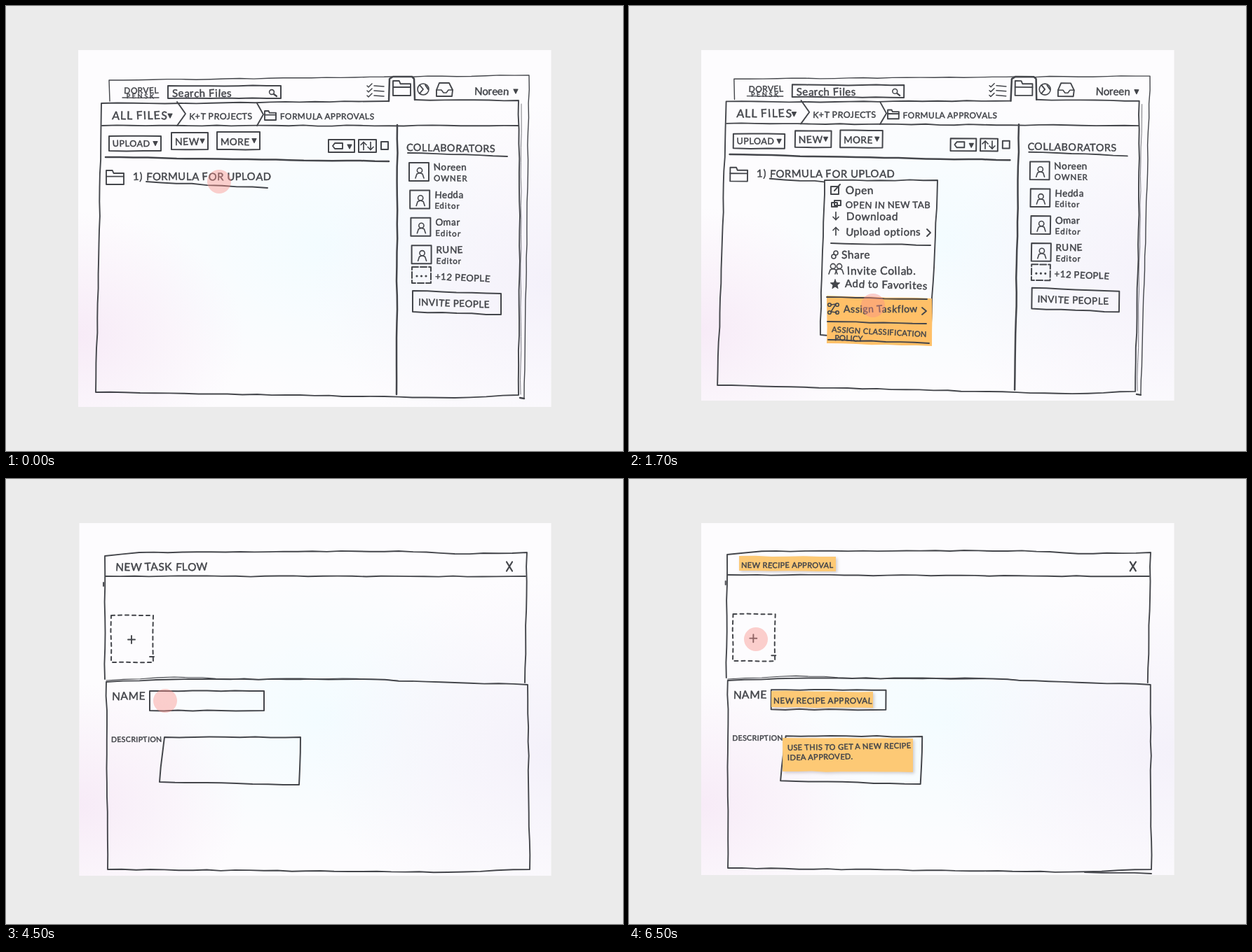
An HTML page for the animation above (8 s loop, 880x636 px).

```html
<!DOCTYPE html>
<html lang="en">
<head>
<meta charset="utf-8">
<title>Task flow wireframe</title>
<style>
html, body { margin: 0; width: 100%; height: 100%; overflow: hidden; background: #ebebeb; }
svg { display: block; width: 100vw; height: 100vh; }
text { font-family: Lato, "Open Sans", sans-serif; fill: #44464b; stroke: #44464b; stroke-width: .5px; white-space: pre; }
path { stroke-linecap: round; stroke-linejoin: round; }
</style>
</head>
<body>
<svg id="stage" viewBox="0 0 880 636" xmlns="http://www.w3.org/2000/svg"></svg>
<script>
const INK = '#44464b', ORANGE = '#ffc068', PALE = '#fdc974', LOOP = 8000;
let out, seed, warp;

const rand = () => {
  seed = (seed * 16807) % 2147483647;
  return seed / 2147483647 - .5;
};

// Each photo was taken from a slightly different angle: shift the four corners.
const bend = ([tl, tr, bl, br]) => (x, y) => {
  const u = (x - 130) / 610, v = (y - 105) / 450;
  const mix = i => (tl[i] * (1 - u) + tr[i] * u) * (1 - v) + (bl[i] * (1 - u) + br[i] * u) * v;
  return [x + mix(0), y + mix(1)];
};
const flat = (x, y) => [x, y];
const fix = n => n.toFixed(1);

// Hand-drawn polyline through "x,y x,y ..."
function ink(s, w = 1.9, { close, fill = 'none', dash, color = INK } = {}) {
  const pts = s.split(' ').map(p => p.split(',').map(Number));
  if (close) pts.push(pts[0]);
  const all = [pts[0]];
  for (let i = 1; i < pts.length; i++) {
    const [ax, ay] = pts[i - 1], [bx, by] = pts[i];
    const n = Math.floor(Math.hypot(bx - ax, by - ay) / 20);
    for (let k = 1; k < n; k++)
      all.push([ax + (bx - ax) * k / n + rand() * 1.3, ay + (by - ay) * k / n + rand() * 1.3]);
    all.push(pts[i]);
  }
  const d = 'M' + all.map(p => warp(...p).map(fix).join(' ')).join('L') + (close ? 'Z' : '');
  out += `<path d="${d}" fill="${fill}" stroke="${color}" stroke-width="${w}"` +
    (dash ? ` stroke-dasharray="${dash}"` : '') + '/>';
}
const shape = (s, w, o) => ink(s, w, { close: true, ...o });

// Box whose sides may drop to the right
const rect = (x, y, w, h, o, drop = 0) =>
  shape(`${x},${y} ${x + w},${y + drop} ${x + w},${y + h + drop} ${x},${y + h}`, 2, o);
const note = (x, y, w, h, drop, fill = ORANGE) => rect(x, y, w, h, { fill, color: 'none' }, drop);

function ring(x, y, r, fill = 'none') {
  const [a, b] = warp(x, y);
  out += `<circle cx="${fix(a)}" cy="${fix(b)}" r="${r}" fill="${fill}" stroke="${INK}" stroke-width="1.6"/>`;
}

function text(s, x, y, size, tilt = 0, gap = size * .04) {
  const [a, b] = warp(x, y).map(fix);
  const turns = [...s].map(() => fix(rand() * 8)).join(' ');
  out += `<text x="${a}" y="${b}" font-size="${size}" letter-spacing="${fix(gap)}"` +
    ` rotate="${turns}" transform="rotate(${tilt} ${a} ${b})">${s}</text>`;
}

const caret = (x, y) => shape(`${x - 3},${y - 3} ${x + 3},${y - 3} ${x},${y + 3}`, 1.2, { fill: INK });
const chevron = (x, y, w, h, lw) => ink(`${x},${y - h} ${x + w},${y} ${x},${y + h}`, lw);
const rule = (x, y, w, drop = 0, lw = 1.9) => ink(`${x},${y} ${x + w},${y + drop}`, lw);

// Arrow with its head at the top (dir 1) or the bottom (dir -1)
function arrow(x, y, dir) {
  const tip = y - 5.5 * dir, wing = tip + 4 * dir;
  ink(`${x},${y + 5.5 * dir} ${x},${tip}`, 1.7);
  ink(`${x - 4},${wing} ${x},${tip} ${x + 4},${wing}`, 1.7);
}

function cross(x, y, rx, ry) {
  ink(`${x - rx},${y - ry} ${x + rx},${y + ry}`, 2.2);
  ink(`${x + rx},${y - ry} ${x - rx},${y + ry}`, 2.2);
}

function folder(x, y, w, h) {
  const lip = y + h * .2, r = x + w, b = y + h;
  shape(`${x},${b} ${x},${y} ${x + w * .35},${y} ${x + w * .42},${lip} ${r},${lip} ${r},${b}`);
  rule(x, y + h * .43, w);
}

function bust(x, y) {
  ring(x, y, 3.6);
  ink(`${x - 6},${y + 11} ${x - 4},${y + 5} ${x},${y + 3.5} ${x + 4},${y + 5} ${x + 6},${y + 11}`, 1.6);
}

function topBar() {
  ink('148,136 147,106 746,99 743,300 739,560', 1.4);
  rule(733, 560, 6, 1, 2.4);
  text('DORVEL', 168, 125, 12);
  text('PENSK', 172, 132, 9, 0, 2.6);
  rule(166, 131, 52, 0, 1.3);
  rect(231, 114, 161, 18);
  text('Search Files', 237, 130, 15);
  ring(379, 123, 3.4);
  rule(382, 126, 4, 3, 2.2);
  for (let y = 115; y < 130; y += 7) {
    ink(`515,${y - 1} 517,${y + 1} 522,${y - 4}`, 1.5);
    rule(525, y - 1, 14, 1, 1.5);
  }
  folder(552, 107, 25, 21);
  ring(595, 119, 8);
  chevron(590, 119, 5, 6);
  rule(598, 113, 4, 6);
  shape('614,120 618,110 632,110 637,120 636,129 614,129');
  ink('614,120 621,120 624,124 628,124 631,120 637,120', 1.6);
  text('Noreen', 668, 127, 15, 0, 0);
  caret(727, 122);
}

function toolButton(label, x, y, w, h, size) {
  rect(x, y, w, h);
  text(label, x + 5, y + h - 6, size);
  caret(x + w - 8, y + h / 2);
}

function browser() {
  topBar();
  ink('546,136 250,139 136,139 133,320 128,552 400,556 640,560 731,556 733,300 731,135 583,134');
  ink('546,136 547,104 552,101 579,101 582,104 583,134', 2.5);
  rule(735, 140, -1, 415, .7);
  rule(137, 171, 594);
  chevron(244, 154, 12, 17);
  chevron(358, 155, 9, 16);
  text('ALL FILES', 151, 162, 16, 0, 1);
  caret(234, 157);
  text('K+T PROJECTS', 261, 162, 12.4);
  folder(369, 150, 16, 13);
  text('FORMULA APPROVALS', 391, 162, 11.8);

  toolButton('UPLOAD', 147, 186, 74, 21, 12.5);
  toolButton('NEW', 236, 181, 52, 24, 14);
  toolButton('MORE', 301, 180, 61, 25, 13.5);
  rect(460, 191, 37, 18);
  shape('466,200 469,196 480,196 480,204 469,204');
  caret(490, 201);
  rect(503, 191, 25, 18);
  arrow(510, 200, 1);
  arrow(520, 200, -1);
  rect(535, 194, 10, 11);
  rule(142, 216, 404, 6, 2.5);
  rule(558, 170, -1, 385, 2.5);

  folder(143, 235, 25, 20);
  text('1)', 181, 249, 15);
  text('FORMULA FOR UPLOAD', 200, 249, 14.8);
  rule(200, 251, 173, 9);
  sidebar();
}

function sidebar() {
  text('COLLABORATORS', 571, 207, 14.3, 1);
  rule(573, 210, 142, 5);
  ['Noreen', 'Hedda', 'Omar', 'RUNE'].forEach((name, i) => {
    const x = 575 + i * 1.2, y = 224 + i * 39.4;
    rect(x, y, 28, 26);
    bust(x + 15, y + 11);
    text(name, x + 35, y + 11, 13.5);
    text(i ? 'Editor' : 'OWNER', x + 35, y + 26, 11.5, 1, 1);
  });
  rect(579, 373, 27, 23, { dash: '9 3' });
  for (let i = 0; i < 3; i++) ring(586 + i * 6.5, 386, .8, INK);
  text('+12 PEOPLE', 612, 391, 13, 2.5);
  rect(580, 407, 126, 30, {}, 4);
  text('INVITE PEOPLE', 588, 428, 13.5, 2);
}

function menuIcons() {
  rect(288, 258, 11, 11);
  rule(293, 264, 8, -9);
  rect(289, 281, 8, 6);
  rect(293, 278, 9, 7);
  arrow(295, 300, -1);
  arrow(295, 322, 1);
  ring(295, 353, 3);
  ring(292, 358, 3);
  bust(291, 372);
  bust(300, 372);
  const star = Array.from({ length: 10 }, (_, i) => {
    const a = i * Math.PI / 5, r = i % 2 ? 3 : 7;
    return `${294 + r * Math.sin(a)},${398 - r * Math.cos(a)}`;
  });
  shape(star.join(' '), 1, { fill: INK });
}

function menu() {
  shape('279,249 440,249 436,350 429,483 273,470 276,350', 1.9, { fill: '#fbfbfd' });
  menuIcons();
  text('Open', 309, 269, 15.5);
  text('OPEN IN NEW TAB', 309, 289, 13);
  text('Download', 310, 306, 15.3);
  text('Upload options', 309, 328, 14.8);
  chevron(425, 324, 5, 5);
  rule(288, 339, 142, 3);
  text('Share', 303, 361, 15.5);
  text('Invite Collab.', 311, 384, 15.8);
  text('Add to Favorites', 308, 402, 15, 1.5);
}

function assignNotes() {
  note(282, 414, 150, 68, 4);
  rule(282, 416, 143, 3);
  for (let i = 0; i < 4; i++) ring(286 + i % 2 * 11, 427 + (i >> 1) * 11, 2.3);
  ink('288,427 295,426 288,437 296,438', 1.6);
  text('Assign Taskflow', 306, 438, 14);
  chevron(418, 436, 6, 5);
  rule(283, 451, 141, 3);
  text('ASSIGN CLASSIFICATION', 289, 466, 11, 3);
  text('POLICY', 293, 478, 11, 2);
  rule(284, 477, 144, 5);
}

function modal() {
  shape('243,170 541,178 549,360 546,515 232,513 238,300', 1.9, { fill: '#fbfdff' });
  out += '<g opacity=".05">';
  menu();
  out += '</g>';
  text('TASKFLOWS', 304, 208, 22, 1.8, 3.3);
  cross(523, 195, 4, 6);
  shape('265,233 525,239 523,450 330,449 258,455 263,330');
  for (let i = 0; i < 5; i++) {
    const y = 273 + i * 39.4;
    rule(264 - i, y, 260, 2 - i);
    if (i === 4) break;
    rule(284, y + 21, 121);
    text('View', 472, y + 28, 16, 0, 1.2);
  }
  note(290, 240, 189, 33, -5);
  text('+ Create New', 317, 262, 17, -.8, 1.6);
  rect(363, 475, 83, 25);
  text('Assign', 371, 494, 17, 0, 2.6);
  rect(453, 474, 73, 25);
  text('Cancel', 462, 493, 16, 0, 1);
}

function form() {
  ink('141,286 141,110 190,105 560,103 640,107 743,105 740,291');
  rule(139, 148, 0, 5);
  rule(142, 139, 599);
  cross(718, 125, 4, 6.5);
  rect(150, 195, 60, 67, { dash: '5 5' });
  rule(205, 254, 6);
  rule(174, 229.5, 10);
  rule(179, 224, 0, 11);
  shape('143,290 260,286 500,286 640,291 744,294 747,558 630,562 145,558');
  ink('143,288 240,283 360,287 480,285 580,289', 1.1);
  text('NAME', 151, 316, 15.5, -1);
  rect(205, 303, 163, 28);
  text('DESCRIPTION', 150, 376, 10.5);
  shape('226,369 420,369 418,437 219,433', 2);
}

const formTitle = () => text('NEW TASK FLOW', 156, 131, 15.3);

function answers() {
  rule(650, 562, 95, 2);
  out += '<g filter="url(#shade)">';
  note(157, 110, 138, 21, 1, PALE);
  note(203, 303, 145, 23, 1, PALE);
  note(219, 370, 186, 48, 1, PALE);
  out += '</g>';
  text('NEW RECIPE APPROVAL', 160, 127, 11);
  text('NEW RECIPE APPROVAL', 206, 321, 11.7);
  text('USE THIS TO GET A NEW RECIPE', 226, 388, 11, -1);
  text('IDEA APPROVED.', 226, 402, 11, -1);
}

// view: how far the four corners move; over: laid on top unbent
const scenes = [
  { start: 0, left: 103, bottom: 573, dot: [304, 251], draw: browser },
  { start: 500, left: 103, bottom: 564, dot: [348, 428], draw: browser,
    view: [[3, -2], [-3, 1], [-2, -10], [-9, -5]], over: () => { menu(); assignNotes(); } },
  { start: 2500, left: 106, bottom: 569, dot: [349, 252], draw: browser,
    view: [[1, -2], [0, 1], [-4, -7], [-6, -1]], over: modal },
  { start: 4500, left: 104.5, bottom: 567, dot: [227, 317], draw: form, over: formTitle },
  { start: 6500, left: 103, bottom: 566, dot: [181, 229], draw: form,
    view: [[-1, -2], [1, 0], [-4, -2], [-2, 0]], over: answers }
];

function render({ left, bottom, dot, view, draw, over }) {
  seed = 4711;
  out = '<rect width="880" height="636" fill="#ebebeb"/>';
  for (const fill of ['#fdfcfe', 'url(#cool)', 'url(#pink)', 'url(#lilac)'])
    out += `<rect x="${left}" y="63" width="${777.5 - left}" height="${bottom - 63}" fill="${fill}"/>`;
  warp = view ? bend(view) : flat;
  draw();
  warp = flat;
  if (over) over();
  out += `<circle cx="${dot[0]}" cy="${dot[1]}" r="17" fill="#f78c87" opacity=".42"/>`;
  return `<g class="scene">${out}</g>`;
}

const glow = (id, x, y, r, color) =>
  `<radialGradient id="${id}" cx="${x}" cy="${y}" r="${r}"><stop offset="0" stop-color="${color}"/>` +
  `<stop offset="1" stop-color="${color}" stop-opacity="0"/></radialGradient>`;

const defs = '<defs>' +
  glow('cool', .52, .55, .42, '#f3fcff') +
  glow('pink', 0, .8, .35, '#f7ebf7') +
  glow('lilac', 1, .65, .5, '#f4f1fa') +
  '<filter id="shade"><feDropShadow dx="2" dy="2" stdDeviation="2" flood-color="#8a7f88" flood-opacity=".4"/></filter></defs>';

const stage = document.getElementById('stage');
stage.innerHTML = defs + scenes.map(render).join('');

// Scenes are stacked; each later one covers the rest from its start to the end of the loop.
stage.querySelectorAll('.scene').forEach((g, i) => {
  if (!i) return;
  const steps = [[0, 0], [scenes[i].start, 1], [LOOP, 1]];
  g.animate(
    steps.map(([t, opacity]) => ({ opacity, offset: t / LOOP, easing: 'step-end' })),
    { duration: LOOP, iterations: Infinity }
  );
});
</script>
</body>
</html>
```
